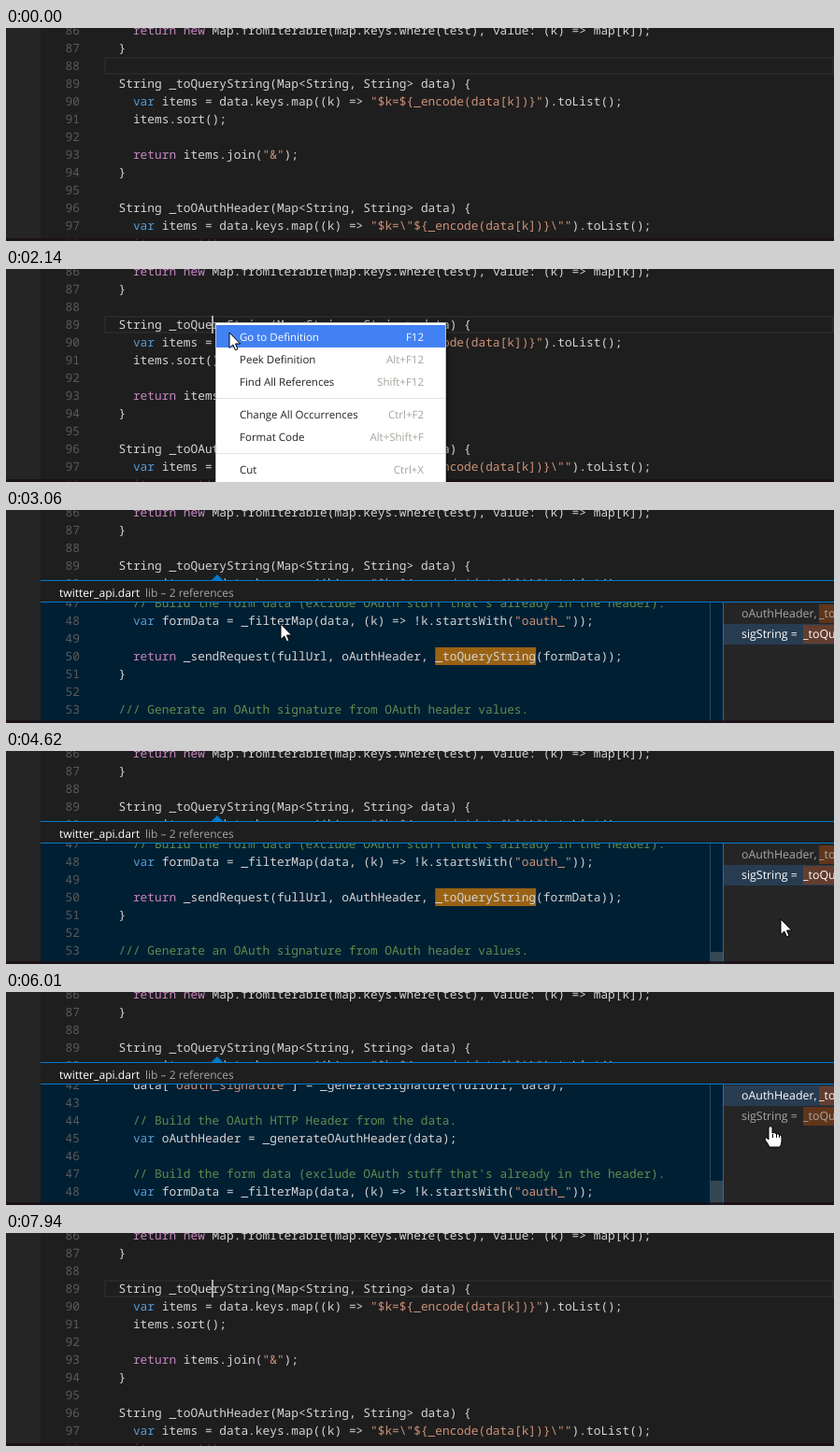
An HTML page with a canvas for the animation above (8630 ms loop, 886 px wide and 228 px high).

```html
<!DOCTYPE html>
<html lang="en">
<head>
<meta charset="utf-8">
<title>Find all references</title>
<style>
html, body { margin: 0; width: 100%; height: 100%; overflow: hidden; background: #1e1e1e; }
canvas { display: block; }
</style>
</head>
<body>
<canvas id="stage" width="886" height="228"></canvas>
<script>
const W = 886, H = 228, LOOP = 8630;
const ROW = 19, CHAR = 7.7, TEXT_X = 120.5;
const CODE_FONT = '12.83px "Noto Sans Mono", monospace';
const ui = size => `${size}px "Open Sans", sans-serif`;
const ctx = document.getElementById('stage').getContext('2d');

const FILE = [
  '  return new Map.fromIterable(map.keys.where(test), value: (k) => map[k]);',
  '}',
  '',
  'String _toQueryString(Map<String, String> data) {',
  '  var items = data.keys.map((k) => "$k=${_encode(data[k])}").toList();',
  '  items.sort();',
  '',
  '  return items.join("&");',
  '}',
  '',
  'String _toOAuthHeader(Map<String, String> data) {',
  '  var items = data.keys.map((k) => "$k=\\"${_encode(data[k])}\\"").toList();',
  '  items.sort();'
];

const PEEK = [
  '  data["oauth_signature"] = _generateSignature(fullUrl, data);',
  '',
  '  // Build the OAuth HTTP Header from the data.',
  '  var oAuthHeader = _generateOAuthHeader(data);',
  '',
  '  // Build the form data (exclude OAuth stuff that\'s already in the header).',
  '  var formData = _filterMap(data, (k) => !k.startsWith("oauth_"));',
  '',
  '  return _sendRequest(fullUrl, oAuthHeader, _toQueryString(formData));',
  '}',
  '',
  '/// Generate an OAuth signature from OAuth header values.'
];

const MENU = [
  { y: 73, label: 'Go to Definition', key: 'F12' },
  { y: 97, label: 'Peek Definition', key: 'Alt+F12' },
  { y: 121, label: 'Find All References', key: 'Shift+F12' },
  { y: 156, label: 'Change All Occurrences', key: 'Ctrl+F2' },
  { y: 180, label: 'Format Code', key: 'Alt+Shift+F' },
  { y: 215, label: 'Cut', key: 'Ctrl+X' }
];

// Pointer moves: start, end, number of steps, points as [share of the way, x, y]
const MOVES = [
  { from: 430, to: 1050, n: 9, path: [[0, 304, 163], [0.5, 262, 104], [1, 228, 59]] },
  { from: 1430, to: 1430, n: 1, path: [[1, 226.5, 58]] },
  { from: 2140, to: 2520, n: 6, path: [[0, 227, 58], [0.5, 262, 88], [1, 293.5, 121.5]] },
  { from: 4150, to: 5000, n: 12, path: [[0, 293, 121], [0.25, 470, 150], [0.42, 720, 178],
    [7 / 12, 829, 180], [0.83, 822, 135], [1, 816, 119]] },
  { from: 5780, to: 6010, n: 4, path: [[0, 816, 119], [1, 818, 143]] },
  { from: 6790, to: 6940, n: 3, path: [[0, 818, 143], [1, 787, 158]] }
];

function along(path, u) {
  let i = 1;
  while (i < path.length - 1 && path[i][0] < u) i++;
  const b = path[Math.min(i, path.length - 1)], a = path[i - 1];
  const k = b[0] > a[0] ? (u - a[0]) / (b[0] - a[0]) : 1;
  return { x: a[1] + (b[1] - a[1]) * k, y: a[2] + (b[2] - a[2]) * k };
}

function pointerAt(t) {
  const move = MOVES.filter(m => t >= m.from).pop();
  if (!move || t >= 7860) return null;
  const beat = (move.to - move.from) / Math.max(1, move.n - 1) || 1;
  const step = Math.min(move.n, Math.floor((t - move.from) / beat + 0.001) + 1);
  const p = along(move.path, step / move.n);
  p.shape = 'arrow';
  if (t < 1430 || t >= 7250 || (t >= 4150 && p.x < 754)) p.shape = 'beam';
  else if (t >= 5150 && t < 6860) p.shape = 'hand';
  return p;
}

function rect(x, y, w, h, color) {
  ctx.fillStyle = color;
  ctx.fillRect(x, y, w, h);
}

function label(str, x, y, font, color, align = 'left') {
  ctx.font = font;
  ctx.fillStyle = color;
  ctx.textAlign = align;
  ctx.fillText(str, x, y);
}

function tokenColor(token) {
  if (token.startsWith('//')) return '#608b4e';
  if (token[0] === '"') return '#ce9178';
  if (token === 'return' || token === 'new') return '#c586c0';
  return token === 'var' ? '#569cd6' : '#d4d4d4';
}

function codeLine(str, x, baseline) {
  for (const m of str.matchAll(/\/\/.*|"(?:\\.|[^"\\])*"|\w+|[^\w\s"]+/g))
    label(m[0], x + m.index * CHAR, baseline, CODE_FONT, tokenColor(m[0]));
}

function codeRows(lines, firstNumber, top) {
  lines.forEach((str, i) => {
    const base = top + i * ROW + 14;
    label(firstNumber + i, 79, base, CODE_FONT, '#5a5a5a', 'right');
    codeLine(str, TEXT_X, base);
  });
}

function drawEditor(t, peekOpen) {
  rect(0, 0, W, H, '#1e1e1e');
  rect(0, 0, 37, H, '#252526');
  if (!peekOpen) {
    const clicked = t >= 1280;
    ctx.strokeStyle = '#282828';
    ctx.lineWidth = 2;
    ctx.strokeRect(106, clicked ? 51 : 32, W - 107, ROW - 2);
  }
  codeRows(FILE, 86, -7);
  if ((t >= 1280 && t < 3060) || t >= 7710) rect(220, 50, 2, ROW, '#aeafad');
}

function listRow(y, text, matchX, active, hover) {
  if (active) rect(768, y, W - 768, 22, '#283c51');
  else if (hover) rect(768, y, W - 768, 22, '#2a2d2e');
  rect(matchX, y + 1, W - matchX, 20, active ? '#633d2e' : '#60351b');
  const color = active ? '#ffffff' : hover ? '#cccccc' : '#a8a8a8';
  label(text, 787, y + 15, ui(12.4), color);
  label('_toQueryString', matchX, y + 15, ui(12.4), color);
}

function sliderShown(t) {
  return (t >= 4150 && t < 4930) || (t >= 5310 && t < 6790);
}

function drawPeek(t, pointer) {
  const first = t >= 5310 && t < 6240;
  rect(37, 75, W - 37, H - 75, '#1e1e1e');
  ctx.fillStyle = '#007acc';
  ctx.beginPath();
  ctx.moveTo(219, 76);
  ctx.lineTo(226, 69);
  ctx.lineTo(233, 76);
  ctx.fill();
  rect(37, 75, W - 37, 1, '#007acc');
  label('twitter_api.dart', 57, 93, ui(12.1), '#ffffff');
  label('lib – 2 references', 149, 93, ui(12), '#a5a5a5');

  ctx.save();
  ctx.beginPath();
  ctx.rect(37, 99, W - 37, H - 99);
  ctx.clip();
  rect(37, 99, 730, H - 99, '#001f33');
  const top = first ? 90 : 90 - 5 * ROW;
  if (!first) rect(TEXT_X + 44 * CHAR, top + 8 * ROW, 14 * CHAR, ROW, '#996214');
  codeRows(first ? PEEK.slice(0, 7) : PEEK, 42, top);

  rect(753, 99, 1, H - 99, '#1f4b68');
  if (sliderShown(t)) rect(754, first ? 202 : 215, 13, 30, 'rgba(121,121,121,0.45)');
  rect(767, 99, 1, H - 99, '#007acc');
  rect(768, 99, W - 768, H - 99, '#252526');
  const overFirst = !!pointer && pointer.x > 768 && pointer.y < 122;
  listRow(100, 'oAuthHeader, ', 870, first, overFirst);
  listRow(122, 'sigString = ', 853, !first, false);
  ctx.restore();
  rect(37, 98, W - 37, 1, '#007acc');
}

function drawMenu(pointer) {
  ctx.save();
  ctx.shadowColor = 'rgba(0,0,0,0.5)';
  ctx.shadowBlur = 4;
  ctx.shadowOffsetX = 1;
  rect(224, 57, 247, H, '#bcbcbc');
  ctx.restore();
  rect(225, 58, 245, H, '#ffffff');
  rect(225, 138, 245, 1, '#e4e4e4');
  rect(225, 197, 245, 1, '#e4e4e4');
  for (const item of MENU) {
    const on = Math.abs(pointer.y - item.y) < 12;
    if (on) rect(225, item.y - 13, 245, 24, '#4281f4');
    label(item.label, 250, item.y + 4, ui(11.5), on ? '#ffffff' : '#222222');
    label(item.key, 447, item.y + 4, ui(11.5), on ? '#ffffff' : '#a5a29c', 'right');
  }
}

const SHAPES = {
  arrow: new Path2D('M0 0V16.5L3.8 13L6.4 18.8L9 17.7L6.5 12H11.6Z'),
  hand: new Path2D('M-2 2Q0-1 2 2V8Q5 6.5 6 9Q8.5 8 9.3 10Q12 9.5 12 12V17Q12 20 10 23' +
    'H-1Q-3 19-6 15Q-6 12-4 13L-2 15Z')
};

function drawPointer(p) {
  ctx.save();
  ctx.translate(Math.round(p.x), Math.round(p.y));
  if (p.shape === 'beam') {
    rect(-3, -8, 3, 1, '#e0e0e0');
    rect(1, -8, 3, 1, '#e0e0e0');
    rect(0, -7, 1, 14, '#e0e0e0');
    rect(-3, 7, 3, 1, '#e0e0e0');
    rect(1, 7, 3, 1, '#e0e0e0');
  } else {
    ctx.fillStyle = '#ffffff';
    ctx.strokeStyle = '#000000';
    ctx.lineWidth = 1;
    ctx.fill(SHAPES[p.shape]);
    ctx.stroke(SHAPES[p.shape]);
    if (p.shape === 'hand') {
      for (const x of [2, 6, 9]) rect(x, 9, 1, 4, '#000000');
    }
  }
  ctx.restore();
}

function draw(t) {
  const peekOpen = t >= 3060 && t < 7250;
  const pointer = pointerAt(t);
  ctx.textRendering = 'geometricPrecision';
  drawEditor(t, peekOpen);
  if (peekOpen) drawPeek(t, pointer);
  rect(0, 225, W, 3, 'rgba(26,13,20,0.75)');
  if (t >= 1590 && t < 2980) drawMenu(pointer);
  if (pointer) drawPointer(pointer);
}

const start = performance.now();
function tick() {
  draw((performance.now() - start) % LOOP);
  requestAnimationFrame(tick);
}
tick();
</script>
</body>
</html>
```
